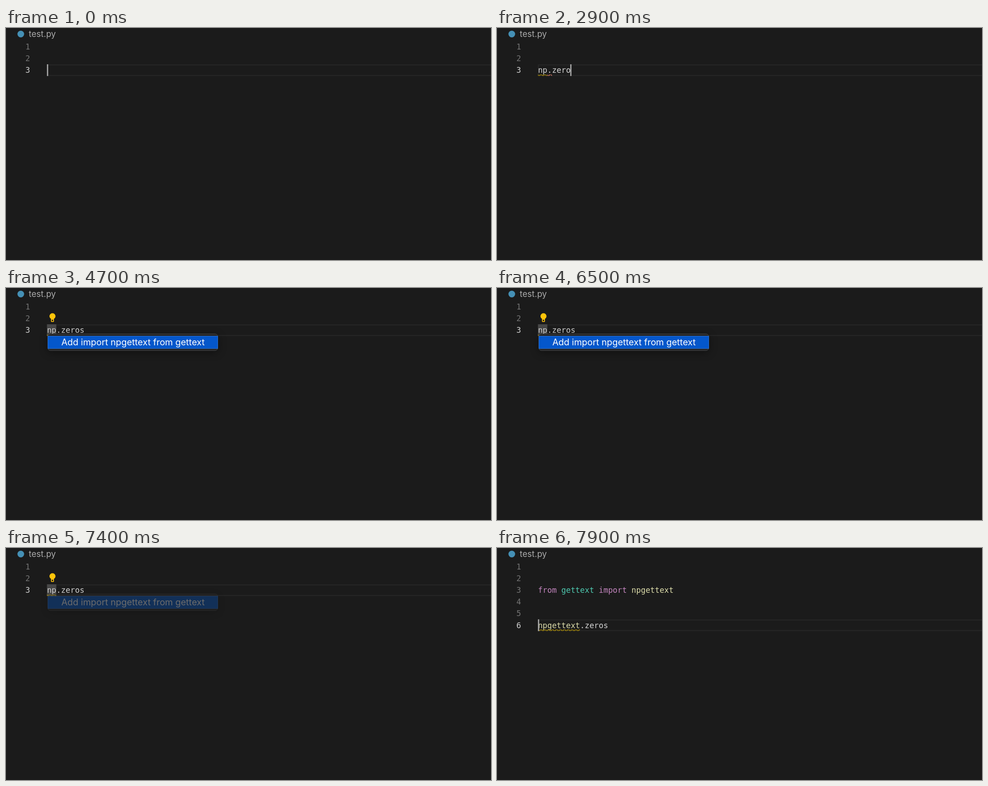
Animation of 1082 by 518 pixels, one loop 8000 ms. Source, as an HTML page:

```html
<!DOCTYPE html>
<html lang="en">
<head>
<meta charset="utf-8">
<title>Editor quick fix</title>
<style>
html, body { margin: 0; width: 100%; height: 100%; overflow: hidden; background: #1b1b1b; }
svg { display: block; width: 1082px; height: 518px; }
text { white-space: pre; font: 17.33px "DejaVu Sans Mono", Menlo, monospace; fill: #d4d4d4; }
.ui { font-family: Inter, "Liberation Sans", sans-serif; }
.title { font-size: 18.9px; fill: #a9a9a9; }
.item { font-size: 19.9px; fill: #fff; }
.number { text-anchor: end; fill: #747474; }
.active { fill: #cfcfcf; }
.keyword { fill: #c586c0; }
.semantic .module { fill: #4ec9b0; }
.semantic .function { fill: #dcdcaa; }
#menu { filter: drop-shadow(0 4px 9px rgba(0, 0, 0, .4)); }
</style>
</head>
<body>
<svg viewBox="0 0 1082 518">
  <defs id="defs"></defs>
  <circle cx="33" cy="13.5" r="7.5" fill="#4590b5"/>
  <text class="ui title" x="50.8" y="20.3">test.py</text>
  <rect id="current" x="92.4" width="1000" height="23.6" fill="none" stroke="#252525" stroke-width="2.5"/>
  <g id="numbers"></g>
  <rect id="word" x="91.4" y="81" width="20.9" height="26.2" fill="#474747"/>
  <text id="typed" x="91.4" y="100.2"></text>
  <g id="fixed">
    <text x="91.4" y="100.2"><tspan class="keyword">from</tspan> <tspan class="module">gettext</tspan> <tspan class="keyword">import</tspan> <tspan class="function">npgettext</tspan></text>
    <text x="91.4" y="178.5"><tspan class="function">npgettext</tspan>.zeros</text>
  </g>
  <rect id="warning" height="4.33" fill="url(#wave-warning)"/>
  <rect id="error" height="4.33" fill="url(#wave-error)"/>
  <rect id="caret" width="2.7" height="26.2" fill="#aaa"/>
  <g id="bulb" fill="#ffc40a">
    <path d="M100.4 68.8A6.7 6.7 0 1 1 107 68.8V74.2Q107 75.7 105.5 75.7H101.9Q100.4 75.7 100.4 74.2Z"/>
    <rect x="102.2" y="70.8" width="3" height="3.3" fill="#1b1b1b"/>
  </g>
  <g id="menu">
    <rect x="93.3" y="102.5" width="379" height="37.2" rx="6" fill="#252526" stroke="#4b4b4b"/>
    <rect x="93.5" y="107.5" width="378.8" height="27.6" fill="#0457cb" stroke="#2b75dd"/>
    <text class="ui item" x="123.4" y="127.7">Add import npgettext from gettext</text>
  </g>
</svg>
<script>
const LOOP = 8000, LEFT = 91.4, CHAR = 10.433, ROW = 26.1;
const FIXED = 7600; // the import has been inserted
const edits = [[0, ''], [1400, 'np'], [1600, 'np.'], [2500, 'np.z'], [2700, 'np.zer'],
  [2900, 'np.zero'], [3000, 'np.zeros']];
const caretMoves = [...edits.map(e => e[0]), 3800, FIXED];

const $ = id => document.getElementById(id);
const show = (id, on) => $(id).style.display = on ? '' : 'none';
const set = (id, attrs) => Object.entries(attrs).forEach(([k, v]) => $(id).setAttribute(k, v));
const rowTop = row => 81 + ROW * (row - 3);

// One wave pattern per severity, in a 6 by 3 unit cell
const wave = (name, color) => `<pattern id="wave-${name}" width="6" height="3" patternUnits="userSpaceOnUse"
  patternTransform="scale(1.444)" fill="${color}">
  <path d="M5.5 0L2.5 3H1.1L4.1 0ZM4 0L6 2V.6L5.4 0ZM0 2L1 3H2.4L0 .6Z"/></pattern>`;
$('defs').innerHTML = wave('warning', '#cca700') + wave('error', '#f48771');

// Moving the whole rect lets each wave begin at its first character
const underline = (id, row, column, length) => set(id, {
  width: length * CHAR,
  transform: `translate(${LEFT + column * CHAR} ${rowTop(row) + 21.9})`
});

for (let row = 1; row <= 6; row++)
  $('numbers').innerHTML += `<text class="number" x="53.8" y="${rowTop(row) + 19.2}">${row}</text>`;
const numbers = [...$('numbers').children];

function render(t) {
  const done = t >= FIXED, row = done ? 6 : 3;
  const typed = edits.findLast(e => e[0] <= t)[1];
  const moved = caretMoves.findLast(m => m <= t);
  const column = t < 3800 ? typed.length : 0;

  numbers.forEach((n, i) => {
    n.style.display = i < row ? '' : 'none';
    n.classList.toggle('active', i === row - 1);
  });
  set('current', { y: rowTop(row) + 1.4 });

  $('typed').textContent = typed;
  show('typed', !done);
  show('fixed', done);
  $('fixed').classList.toggle('semantic', t >= 7800);

  show('caret', (t - moved) % 1000 < 500);
  set('caret', { x: Math.max(LEFT, LEFT + column * CHAR - 1), y: rowTop(row) });

  show('warning', t >= 2100 && (!done || t >= 7800));
  underline('warning', row, 0, done ? 9 : 2);
  show('error', t >= 2100 && t < 3300);
  underline('error', 3, 2, 1);

  show('word', t >= 4000 && !done);
  show('bulb', t >= 4000 && t < 7700);
  show('menu', t >= 4700 && t < FIXED);
  $('menu').style.opacity = t < 7300 ? 1 : t < 7400 ? .8 : t < 7500 ? .35 : .06;
}

const start = performance.now();
function tick() {
  render((performance.now() - start) % LOOP);
  requestAnimationFrame(tick);
}
tick();
</script>
</body>
</html>
```
